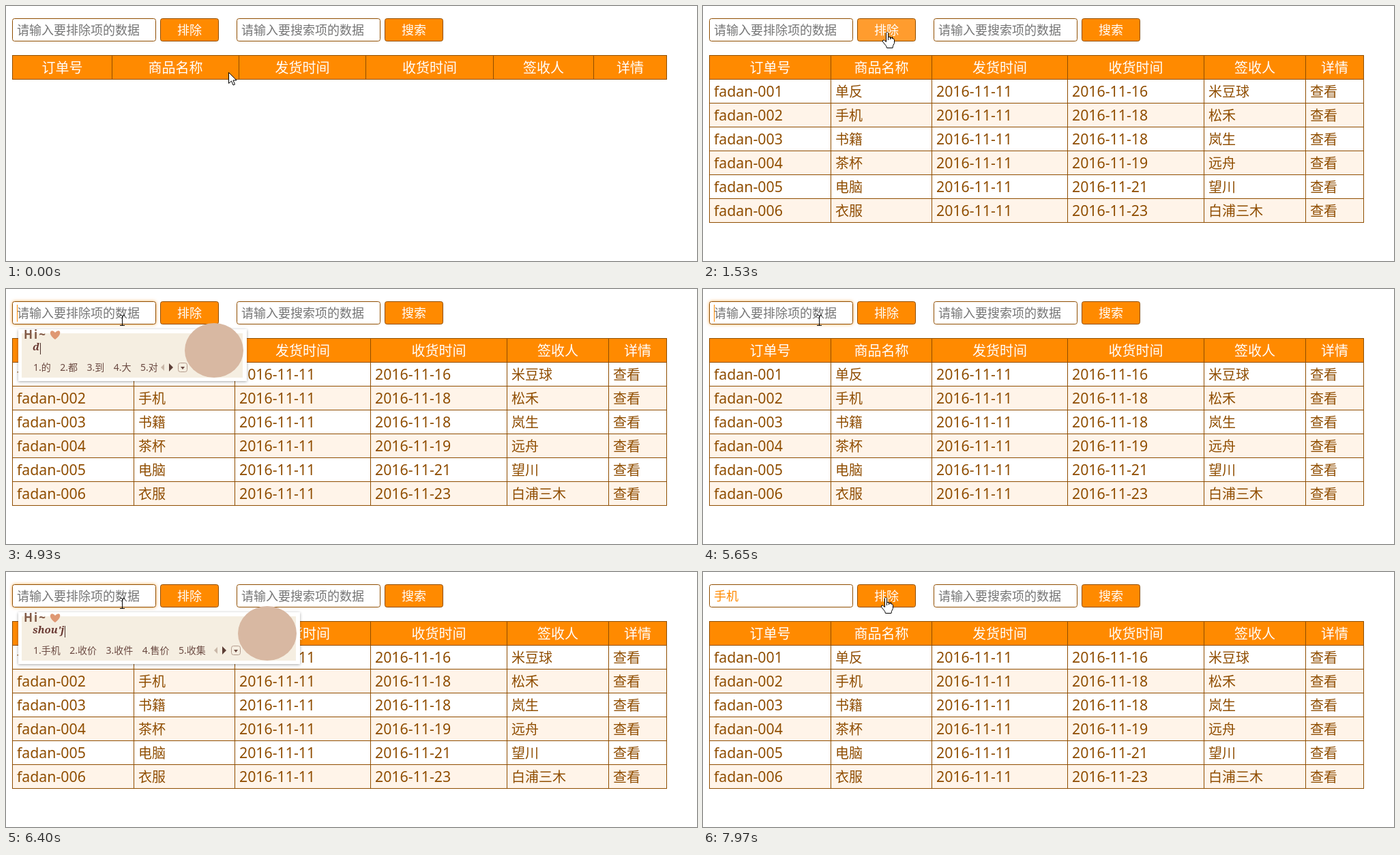
An HTML page with a canvas for the animation above (8000 ms loop, 1013x374 px).

```html
<!DOCTYPE html>
<html lang="zh-CN">
<head>
<meta charset="utf-8">
<title>订单表</title>
<style>
html, body { margin: 0; width: 100%; height: 100%; overflow: hidden; background: #fff; }
canvas { display: block; }
</style>
</head>
<body>
<canvas id="stage" width="1013" height="374"></canvas>
<script>
const ctx = document.getElementById('stage').getContext('2d');
const LOOP = 8000;
const ORANGE = '#ff8a00', HOVER = '#ff9c2e', BROWN = '#8f4d00', STRIPE = '#fff4e9', GREY = '#757575';
const CJK = '"Noto Sans CJK SC", "Noto Sans CJK", sans-serif';
const LATIN = '"Noto Sans", "Open Sans", sans-serif';

const HEADS = ['订单号', '商品名称', '发货时间', '收货时间', '签收人', '详情'];
const EMPTY_COLS = [9, 155, 341, 527, 714, 861, 968];
const FULL_COLS = [9, 187, 335, 534, 734, 883, 968];
const ROWS = [
  ['单反', 16, '米豆球'],
  ['手机', 18, '松禾'],
  ['书籍', 18, '岚生'],
  ['茶杯', 19, '远舟'],
  ['电脑', 21, '望川'],
  ['衣服', 23, '白浦三木']
].map(([item, day, who], i) =>
  ['fadan-00' + (i + 1), item, '2016-11-11', '2016-11-' + day, who, '查看']);

// Input method panel: start, end, typed letters, right edge, candidates
const PANELS = [
  [4930, 5480, 'd', 353, '的 都 到 大 对'],
  [5565, 5650, 'd', 353, '的 都 到 大 对'],
  [5800, 5950, 's', 350, '是 时 上 说 使'],
  [5950, 6020, 'sh', 360, '是 上 时 说 使'],
  [6020, 6180, 'sho', 379, '手 收 首 受到 收到'],
  [6180, 6400, 'shou', 384, '手 收 受 首先 收到'],
  [6400, 6640, "shou'j", 431, '手机 收价 收件 售价 收集']
];

// Pointer moves: start, end, steps, from, to
const MOVES = [
  [70, 800, 12, [326, 97], [269, 38]],
  [2050, 2680, 9, [269, 38], [170, 46]],
  [7350, 7730, 6, [170, 46], [267, 37]]
];

function text(str, x, y, font, color, align = 'left') {
  ctx.font = font;
  ctx.fillStyle = color;
  ctx.textAlign = align;
  ctx.fillText(str, x, y);
}

function fill(color, x, y, w, h) {
  ctx.fillStyle = color;
  ctx.fillRect(x, y, w, h);
}

function box(x, y, w, h, bg, border) {
  ctx.beginPath();
  ctx.roundRect(x + .5, y + .5, w - 1, h - 1, 3);
  ctx.fillStyle = bg;
  ctx.fill();
  ctx.shadowColor = 'transparent';
  ctx.lineWidth = 1;
  ctx.strokeStyle = border;
  ctx.stroke();
}

function shape(points, x, y, bg, border) {
  ctx.beginPath();
  points.forEach(([px, py]) => ctx.lineTo(x + px, y + py));
  ctx.closePath();
  ctx.fillStyle = bg;
  ctx.fill();
  if (border) {
    ctx.lineWidth = 1;
    ctx.strokeStyle = border;
    ctx.stroke();
  }
}

function input(x, hint, value, focused) {
  ctx.save();
  if (focused) {
    ctx.shadowColor = 'rgba(255,138,0,.8)';
    ctx.shadowBlur = 5;
  }
  box(x, 18, 211, 34, '#fff', BROWN);
  ctx.restore();
  text(value || hint, x + 7, 42, '18px ' + CJK, value ? ORANGE : GREY);
}

function button(x, label, hover) {
  box(x, 18, 86, 34, hover ? HOVER : ORANGE, BROWN);
  text(label, x + 43, 42, '18px ' + CJK, '#fff', 'center');
}

function table(full) {
  const cols = full ? FULL_COLS : EMPTY_COLS;
  const count = full ? ROWS.length : 0;
  fill(ORANGE, 9, 72, 960, 36);
  HEADS.forEach((head, i) =>
    text(head, (cols[i] + cols[i + 1] + 1) / 2, 98, '20px ' + CJK, '#fff', 'center'));
  for (let r = 0; r < count; r++) {
    const y = 107 + r * 35;
    if (r % 2) fill(STRIPE, 9, y, 960, 35);
    ROWS[r].forEach((cell, i) => {
      const font = /\d/.test(cell) ? '21.3px ' + LATIN : '20px ' + CJK;
      text(cell, cols[i] + 7, y + 26, font, BROWN);
    });
  }
  for (const x of cols) fill(BROWN, x, 72, 1, 36 + count * 35);
  for (let r = -1; r <= count; r++) fill(BROWN, 9, 107 + r * 35, 960, 1);
}

function panel([, , typed, right, list]) {
  ctx.save();
  ctx.shadowColor = 'rgba(0,0,0,.35)';
  ctx.shadowBlur = 4;
  ctx.shadowOffsetY = 1;
  fill('#fff', 18, 59, right - 18, 76);
  ctx.restore();
  fill('#f5eee1', 23, 65, right - 29, 65);

  ctx.letterSpacing = '2px';
  text('Hi~', 26, 73, 'bold 17px ' + LATIN, '#825a46');
  ctx.letterSpacing = '0px';
  ctx.beginPath();
  ctx.moveTo(72, 74);
  ctx.bezierCurveTo(59, 65, 67, 57, 72, 64);
  ctx.bezierCurveTo(78, 57, 85, 65, 72, 74);
  ctx.fillStyle = '#df9873';
  ctx.fill();

  text(typed, 39, 90, 'italic bold 15px "Noto Serif", serif', '#6b3c35');
  fill('#4c302a', Math.round(40 + ctx.measureText(typed).width), 79, 1, 17);
  const font = '14px ' + LATIN.replace('sans-serif', CJK);
  let x = 40;
  list.split(' ').forEach((word, i) => {
    const label = i + 1 + '.' + word;
    text(label, x, 120, font, '#6b4a42');
    x += ctx.measureText(label).width + 13.5;
  });

  shape([[0, 0], [5, -5], [5, 5]], right - 126, 115, '#c9b7a8');
  shape([[0, -6], [6, 0], [0, 6]], right - 114, 115, '#5c3e36');
  box(right - 101, 108, 14, 14, '#f5eee1', '#b49b8c');
  shape([[-3, -1], [3, -1], [0, 3]], right - 94, 115, '#6b4a42');

  ctx.beginPath();
  ctx.ellipse(right - 48, 90, 43, 40, 0, 0, Math.PI * 2);
  ctx.fillStyle = '#d8b8a2';
  ctx.fill();
}

function arrow(x, y) {
  shape([[0, 0], [0, 16], [4, 12.5], [6.5, 18.5], [9, 17.5], [6.5, 11.5], [11.5, 11.5]],
    x + .5, y + .5, '#fff', '#000');
}

function hand(x, y) {
  ctx.save();
  ctx.lineJoin = 'round';
  shape([[-1, 1], [0, 0], [1, 0], [2, 1], [2, 7], [5, 7], [5.5, 8.5], [8, 8], [8.5, 9.5],
    [10, 9.5], [11, 11], [11, 16], [9, 20], [8.5, 23], [0, 23], [-1, 20], [-6, 14],
    [-6, 12], [-4, 11.5], [-1, 14]], x + .5, y + .5, '#fff', '#000');
  for (const [dx, len] of [[2, 5], [5, 4], [8, 3]]) fill('#000', x + dx, y + 7, 1, len);
  ctx.restore();
}

function beam(x, y) {
  fill('#000', x, y - 7, 1, 15);
  for (const dy of [-8, 7]) {
    fill('#000', x - 3, y + dy, 3, 1);
    fill('#000', x + 1, y + dy, 3, 1);
  }
}

function pointerAt(t) {
  let pos = MOVES[0][3];
  for (const [start, end, steps, from, to] of MOVES) {
    if (t < start) break;
    const step = Math.min(steps, Math.floor((t - start) / (end - start) * (steps - 1)) + 1);
    const p = step / steps;
    const k = p * p * (3 - 2 * p);
    pos = from.map((v, i) => Math.round(v + (to[i] - v) * k));
  }
  return pos;
}

function draw(t) {
  const [x, y] = pointerAt(t);
  const inBar = y >= 18 && y < 52;
  const onButton = inBar && x >= 226 && x < 312;
  const onInput = inBar && x >= 9 && x < 220;
  const pressed = (t >= 1360 && t < 1530) || t >= 7970;
  const focused = t >= 2680 && t < 7970;
  const value = t >= 6640 ? '手机' : '';

  fill('#fff', 0, 0, 1013, 374);
  input(9, '请输入要排除项的数据', value, focused);
  if (focused && (t < 6400 || value)) fill(ORANGE, value ? 52 : 16, 23, 1, 25);
  button(226, '排除', onButton && !pressed);
  input(338, '请输入要搜索项的数据');
  button(555, '搜索');
  table(t >= 1530);

  const open = PANELS.find(([start, end]) => t >= start && t < end);
  if (open) panel(open);
  (onButton ? hand : onInput ? beam : arrow)(x, y);
}

const begin = performance.now();
function tick() {
  draw((performance.now() - begin) % LOOP);
  requestAnimationFrame(tick);
}
tick();
</script>
</body>
</html>
```
